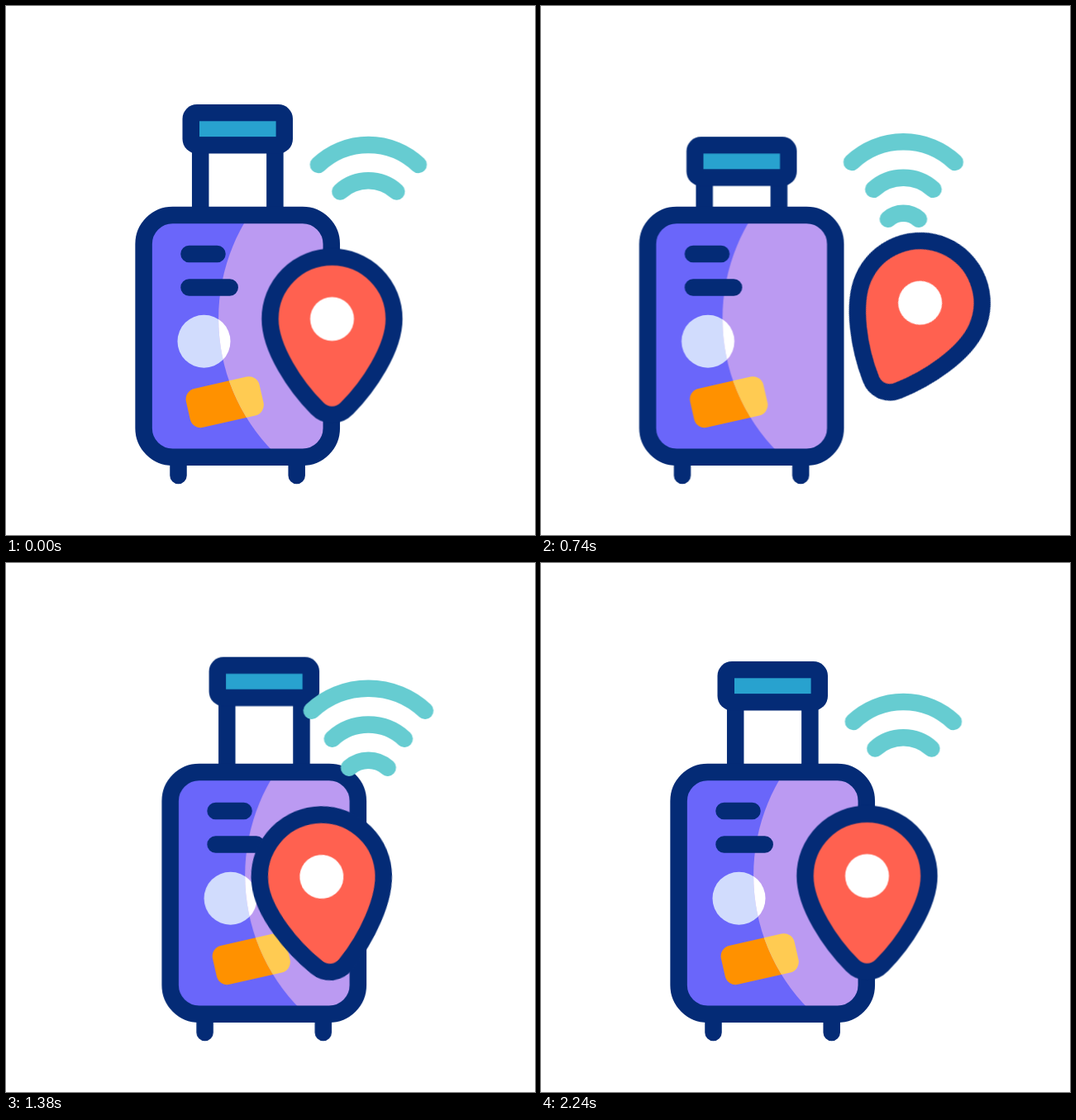
An HTML page for the animation above (2400 ms loop, 640 by 640 pixels).

```html
<!DOCTYPE html>
<html lang="en">
<head>
<meta charset="utf-8">
<title>Suitcase tracking</title>
<style>
  :root {
    --navy: #042b76;
    --smooth: cubic-bezier(.333, 0, .667, 1);
    /* signal arc at each stage of its climb */
    --s0: path('M-17.2 260.8A26 26 0 0 1 17.2 260.8');
    --s1: path('M-34 224.5A50.4 50.4 0 0 1 34 224.5');
    --s2: path('M-60.5 192A88.2 88.2 0 0 1 60.5 192');
    --s3: path('M-82.8 155.3A122.3 122.3 0 0 1 82.8 155.3');
    --s3-high: path('M-82.8 144.6A122.3 122.3 0 0 1 82.8 144.6');
  }
  html, body { margin: 0; width: 100%; height: 100%; overflow: hidden; background: #fff; }
  svg { display: block; width: 100%; height: 100%; }
  .line { fill: none; stroke: var(--navy); stroke-width: 20.5; stroke-linecap: round; }
  .navy { fill: var(--navy); }

  .case, .handle, .pin-x, .pin-y, .pin { animation: 2400ms var(--smooth) infinite; }
  .case { animation-name: case; }
  .handle { animation-name: handle; }
  .pin-x { animation-name: pin-x; }
  .pin-y { animation-name: pin-y; }
  .pin { animation-name: pin-turn; }

  .arc { fill: none; stroke: #66ccd1; stroke-width: 20.5; stroke-linecap: round; animation: 2400ms linear infinite; }
  .low { d: var(--s0); animation-name: low, appear; }
  .mid { d: var(--s1); animation-name: mid; }
  .top { d: var(--s2); animation-name: top; }

  @keyframes case {
    0%, 8.333% { transform: translateX(0); }
    33.333% { transform: translateX(-38.6px); }
    62.083% { transform: translateX(37.2px); }
    93.333%, 100% { transform: translateX(0); }
  }
  @keyframes handle {
    0%, 8.333% { transform: translateY(0); }
    33.333%, 40.833% { transform: translateY(40.3px); }
    65.833% { transform: translateY(-21.1px); }
    93.333%, 100% { transform: translateY(0); }
  }
  @keyframes pin-x {
    0% { transform: translateX(0); }
    8.333% { transform: translateX(0); animation-timing-function: cubic-bezier(.45, 0, .7, 1); }
    40.417% { transform: translateX(87.5px); }
    57.917% { transform: translateX(-12.8px); }
    67.083% { transform: translateX(13.6px); }
    76.667%, 100% { transform: translateX(0); }
  }
  @keyframes pin-y {
    0%, 8.333% { transform: translateY(0); }
    33.333%, 38.75% { transform: translateY(-20px); }
    57.917%, 67.083% { transform: translateY(1px); }
    76.667%, 100% { transform: translateY(0); }
  }
  @keyframes pin-turn {
    0%, 8.333% { transform: rotate(0deg); }
    40% { transform: rotate(29.5deg); }
    57.917% { transform: rotate(-6.3deg); }
    67.083% { transform: rotate(6.3deg); }
    76.667%, 100% { transform: rotate(0deg); }
  }
  @keyframes low {
    0%, 8.333%, 29.165%, 49.998%, 70.832%, 91.665%, 100% { d: var(--s0); }
    29.16%, 49.99%, 70.825%, 91.66% { d: var(--s1); }
  }
  @keyframes mid {
    0%, 8.333%, 29.165%, 49.998%, 70.832%, 91.665%, 100% { d: var(--s1); }
    29.16%, 49.99%, 70.825%, 91.66% { d: var(--s2); }
  }
  @keyframes top {
    0%, 8.333%, 29.165%, 49.998%, 70.832%, 91.665%, 100% { d: var(--s2); }
    29.16% { d: var(--s3-high); }
    49.99%, 70.825%, 91.66% { d: var(--s3); }
  }
  @keyframes appear {
    0%, 8.36% { opacity: 0; }
    8.37%, 91.66% { opacity: 1; }
    91.665%, 100% { opacity: 0; }
  }
</style>
</head>
<body>
<svg viewBox="0 0 640 640">
  <defs>
    <rect id="body" x="166.6" y="253" width="227.2" height="292.8" rx="35"/>
    <circle id="badge" cx="239.5" cy="405.7" r="32"/>
    <rect id="sticker" x="-45.5" y="-24" width="91" height="48" rx="13" transform="translate(264.7 479.2) rotate(-12.8)"/>
    <clipPath id="in-body"><use href="#body"/></clipPath>
    <clipPath id="shine"><circle cx="486.7" cy="378" r="229.6"/></clipPath>
  </defs>

  <g class="case">
    <g class="handle">
      <path class="line" d="M235.2 160V262M325.4 160V262"/>
      <rect class="navy" x="213.5" y="119" width="133.5" height="59.5" rx="17.5"/>
      <rect x="234" y="139.3" width="92.6" height="18.8" fill="#28a2cf"/>
    </g>
    <path class="line" d="M208.5 546V568M351.7 546V568"/>
    <use href="#body" fill="#6a66fa"/>
    <use href="#badge" fill="#d1dcfd"/>
    <use href="#sticker" fill="#ff9100"/>
    <g clip-path="url(#in-body)">
      <g clip-path="url(#shine)">
        <use href="#body" fill="#bb9af2"/>
        <use href="#badge" fill="#fff"/>
        <use href="#sticker" fill="#ffcb52"/>
      </g>
    </g>
    <use href="#body" class="line"/>
    <path class="line" d="M221.5 300H255.5M221.5 340.5H270.7"/>
  </g>

  <g transform="translate(394.5 378.6)">
    <g class="pin-x"><g class="pin-y"><g class="pin">
      <path class="line" style="fill:#ff6150" d="M75 0C75 36 44 82 18 108C8 118.5-8 118.5-18 108C-44 82-75 36-75 0A75 75 0 0 1 75 0Z"/>
      <circle r="26.5" fill="#fff"/>
    </g></g></g>
  </g>

  <g transform="translate(438.4 0)">
    <path class="arc low"/>
    <path class="arc mid"/>
    <path class="arc top"/>
  </g>
</svg>
</body>
</html>
```
